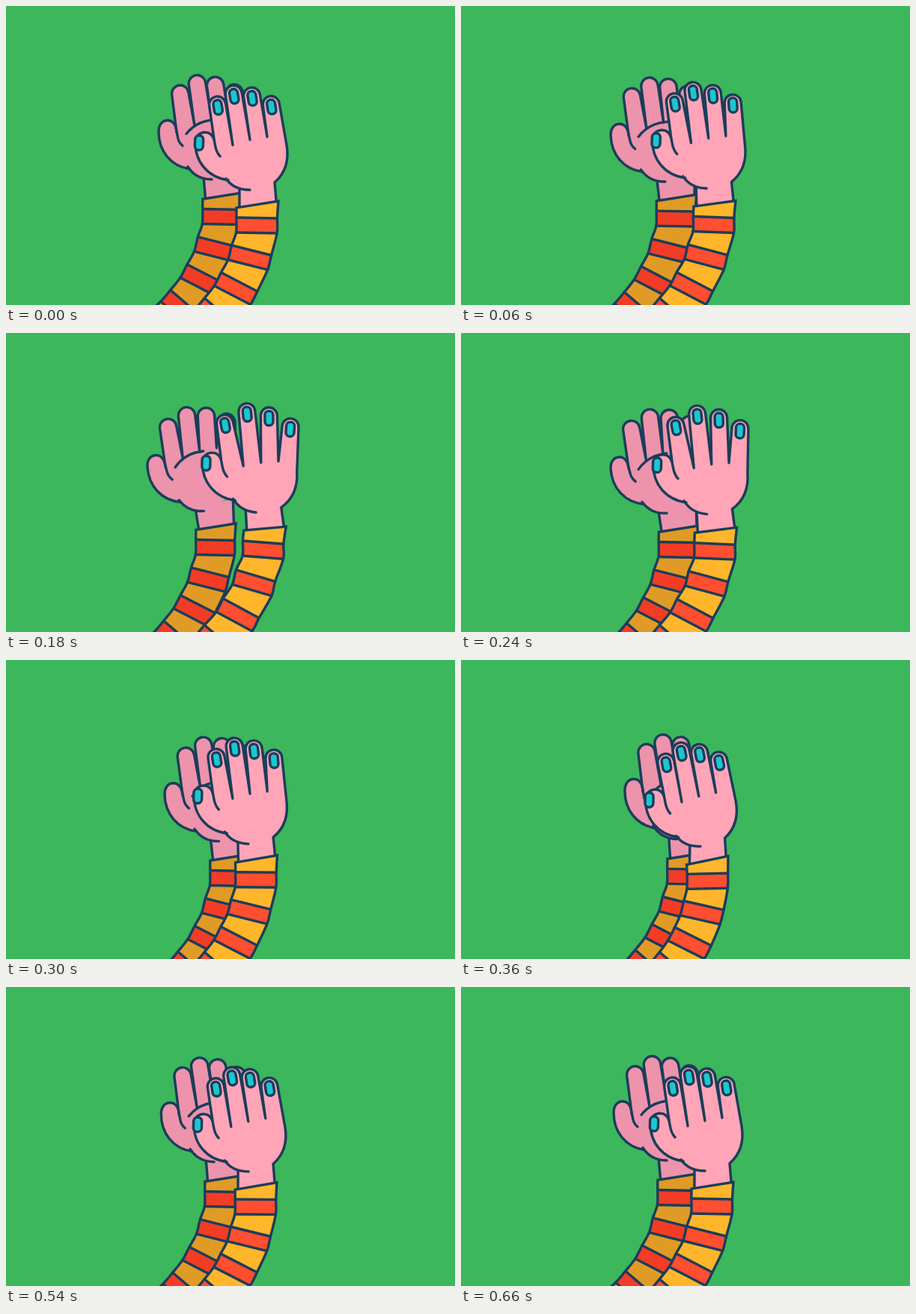
Recreate the animation shown at these times as an HTML page. Size 600 px wide and 400 px high, loop 0.69 s.

```html
<!DOCTYPE html>
<html lang="en">
<head>
<meta charset="utf-8">
<title>Clapping hands</title>
<style>
  html, body { margin: 0; width: 100%; height: 100%; overflow: hidden; background: #3cb75c; }
  svg { display: block; width: 100vw; height: 100vh; }
</style>
</head>
<body>
<svg id="stage" viewBox="0 0 600 400" fill="none" stroke="#1b3d5a" stroke-width="3.4"
     stroke-linecap="round" stroke-linejoin="round"></svg>
<script>
const LOOP = 690;
const stage = document.getElementById('stage');

// time, front arm sway, openness of both hands, rear arm shift x and y
const KEYS = [
  [0, 0, 0, 0, 0],
  [120, 7.5, 1, -4.5, 6],
  [180, 10, 1.05, -9, 5],
  [240, 4.5, 0.95, 1.5, 8],
  [300, -1.5, 0.35, 10, 10],
  [380, -8, -0.5, 13.5, 7],
  [420, -7.5, -0.45, 13, 6],
  [540, -2, -0.05, 3, 2],
  [660, 0, 0, 0, 0]
];

// Smooth interpolation through the keys, at rest on both ends
function poseAt(t) {
  let n = 0;
  while (n < KEYS.length - 2 && t >= KEYS[n + 1][0]) n++;
  const a = KEYS[n], b = KEYS[n + 1], d = b[0] - a[0];
  const u = Math.min(1, (t - a[0]) / d), u2 = u * u, u3 = u2 * u;
  const slope = (k, i) => {
    const p = KEYS[k - 1], q = KEYS[k + 1];
    return p && q ? (q[i] - p[i]) / (q[0] - p[0]) : 0;
  };
  const [, sway, open, dx, dy] = a.map((v, i) =>
    v * (2 * u3 - 3 * u2 + 1) + b[i] * (3 * u2 - 2 * u3) +
    d * (slope(n, i) * (u3 - 2 * u2 + u) + slope(n + 1, i) * (u3 - u2)));
  return { sway, open, dx, dy };
}

const rad = deg => deg * Math.PI / 180;
const pt = p => p[0].toFixed(2) + ',' + p[1].toFixed(2);
const line = pts => 'M' + pts.map(pt).join('L');
const path = (d, attr = '') => `<path d="${d}" ${attr}/>`;
const fill = (d, color) => path(d, `fill="${color}" stroke="none"`);
const mix = (a, b, k) => [a[0] + (b[0] - a[0]) * k, a[1] + (b[1] - a[1]) * k];

// Point at a distance from p; 0 degrees is up, positive is clockwise
const polar = (p, deg, r) => [p[0] + r * Math.sin(rad(deg)), p[1] - r * Math.cos(rad(deg))];

// Turns points and path strings about a pivot, then shifts them
function placer([px, py], deg, dx, dy) {
  const c = Math.cos(rad(deg)), s = Math.sin(rad(deg));
  const at = ([x, y]) => [
    px + dx + (x - px) * c - (y - py) * s,
    py + dy + (x - px) * s + (y - py) * c
  ];
  const draw = d => d.replace(/([\d.]+),([\d.]+)/g, (_, x, y) => pt(at([+x, +y])));
  return { at, draw };
}

function smooth(pts) {
  let d = 'M' + pt(pts[0]);
  for (let i = 0; i < pts.length - 1; i++) {
    const a = pts[i], b = pts[i + 1], p = pts[i - 1] || a, n = pts[i + 2] || b;
    d += 'C' + [
      [a[0] + (b[0] - p[0]) / 6, a[1] + (b[1] - p[1]) / 6],
      [b[0] - (n[0] - a[0]) / 6, b[1] - (n[1] - a[1]) / 6], b
    ].map(pt).join(' ');
  }
  return d;
}

const nail = ([x, y], deg) =>
  `<rect x="-5.5" y="-9.7" width="11" height="19.4" rx="5.2" fill="#1cc6d0"
    transform="translate(${x.toFixed(2)} ${y.toFixed(2)}) rotate(${deg.toFixed(2)})"/>`;

// Pairs of edge points down a sleeve: the cuff, then both sides of each red stripe
function sleeveRows(x, y, half, sway) {
  const rows = [];
  const add = (c, deg, w, depth) => {
    const k = sway * Math.max(0, 1 - depth);
    const mid = [c[0] + x + k, c[1] + y - 0.4 * k];
    rows.push([-w, w].map(r => polar(mid, deg + 0.4 * k + 90, r)));
  };
  add([336, 265.5], -9, half + 1, 0);
  let c = [335, 293.5];
  for (let n = 0; n < 5; n++) {
    const deg = 1 + 13.2 * n;
    for (const side of [10, -10]) add(polar(c, deg, side), deg, half, 0.15 + 0.3 * n);
    c = polar(c, 192.3 + 11.8 * n, 44 + 1.5 * n);
  }
  return rows;
}

function sleeve(rows, colors) {
  let bands = '', lines = '';
  for (let i = 1; i < rows.length; i++) {
    const [a, b] = rows[i - 1], [c, d] = rows[i];
    bands += fill(line([a, b, d, c]) + 'Z', colors[(i - 1) % 2]);
    lines += path(line([c, d]));
  }
  const edge = smooth(rows.map(r => r[0]).reverse()) +
    smooth(rows.map(r => r[1])).replace('M', 'L');
  return bands + lines + path(edge, 'stroke-linejoin="miter"');
}

function wrist(left, right, cuff, skin) {
  const l = [left, mix(...cuff, 0.07)], r = [right, mix(...cuff, 0.95)];
  return fill(line([...l, r[1], r[0]]) + 'Z', skin) + path(line(l) + line(r));
}

// Four fingers between five knuckles, each with a length and a lean
function fingers(knuckles, lengths, lean, r) {
  const tips = lengths.map((len, i) => {
    const deg = lean(i);
    return { deg, c: polar(mix(knuckles[i], knuckles[i + 1], 0.5), deg, len) };
  });
  const d = tips.reduce((s, { deg, c }, i) => s +
    `L${pt(polar(c, deg - 90, r))}A${r},${r} 0 0 1 ${pt(polar(c, deg + 90, r))}L${pt(knuckles[i + 1])}`,
    'M' + pt(knuckles[0]));
  return { d, tips };
}

function hand({ outline, thumb, crease, heel, close }, skin) {
  return fill(outline + crease + 'Z', skin) + fill(thumb + close + 'Z', skin) +
    fill(heel + 'Z', skin) + path(outline) + path(thumb) + path(heel);
}

function rearArm({ open, dx, dy }) {
  const skin = '#ed93ac', turn = -3.9 * open;
  const { at, draw } = placer([290, 255], turn, dx, dy);
  const rows = sleeveRows(dx - 46.5, dy - 11.5, 26, 0);
  const knuckles = [[228, 169], [252, 160], [275, 153], [298, 149], [324, 160]].map(at);
  const f = fingers(knuckles, [48, 53.5, 45.6, 39], i => turn - 8.7 + (3 + 3 * i) * open, 11.2);
  return wrist(at([264, 228]), at([315, 218]), rows[0], skin) +
    hand({
      outline: f.d + draw('C326,178 326,200 312,215'),
      thumb: draw('M236,187C229,181 230,176 228,168C227,158 222,153 216,153' +
        'C208,153 204,160 204,168C204,194 220,214 245,218'),
      crease: draw('L231,188'),
      heel: draw('M243,215C250,226 260,232 275,232'),
      close: draw('L275,232L312,215')
    }, skin) +
    path(draw('M241,171C248,162 260,153 280,152')) +
    sleeve(rows, ['#e09b26', '#f33c25']);
}

function frontArm({ sway, open }) {
  const skin = '#ffa5b7', turn = 5.5 * open, spread = Math.max(0, open);
  const { at, draw } = placer([345, 225], turn, sway, -0.4 * sway);
  // The thumb follows its root but stays upright
  const root = [297, 233], moved = at(root);
  const thumb = placer(root, 0, moved[0] - root[0], moved[1] - root[1]);
  const rows = sleeveRows(0, 0, 27.3, sway);
  const knuckles = [thumb.at([278, 178]), ...[[303, 186], [326, 179], [349, 175], [375, 186]].map(at)];
  const lengths = [50.6, 66, 57.7, 49.6].map(v => v * (1 + 0.07 * spread));
  const f = fingers(knuckles, lengths, i => turn - 9 + (4.6 * i - 7) * spread, 11);
  return wrist(at([312, 244]), at([359, 236]), rows[0], skin) +
    hand({
      outline: f.d + draw('C378,204 375,222 359,236'),
      thumb: thumb.draw('M286,201C279,194 280,186 278,179C276,172 271,169 266,169' +
        'C258,169 253,175 253,183C253,208 269,229 297,233'),
      crease: thumb.draw('L281,202'),
      heel: draw('M294,231C301,241 311,246 326,246'),
      close: draw('L326,246L359,236')
    }, skin) +
    f.tips.map(({ c, deg }) => nail(polar(c, deg, -3.5), deg)).join('') +
    nail(thumb.at([258, 183]), 2) +
    sleeve(rows, ['#ffb62b', '#ff4e30']);
}

// Three rays, 45 degrees apart, that shoot out from a centre
function burst(center, deg, t) {
  if (t < 375 || t > 470) return '';
  const head = t <= 420 ? (t - 360) / 60 : 1 + (t - 420) / 200;
  const tail = Math.max(0, (t - 420) / 50);
  return [-45, 0, 45].map(a => path(
    line([tail, head].map(k => polar(center, deg + a, 23 + 33.5 * k))), 'stroke-width="3"')).join('');
}

let shown = -1;
function render(now) {
  const ms = now % LOOP;
  const step = ms < 300 || ms >= 600 ? 60 : 30;
  const t = Math.floor(ms / step) * step;
  if (t === shown) return;
  shown = t;
  const pose = poseAt(t);
  stage.innerHTML = '<rect width="600" height="400" fill="#3cb75c" stroke="none"/>' +
    rearArm(pose) + frontArm(pose) +
    burst([318, 102], 15, t) + burst([245.5, 230], 225, t);
}

const start = performance.now();
function tick() {
  render(performance.now() - start);
  requestAnimationFrame(tick);
}
tick();
</script>
</body>
</html>
```
